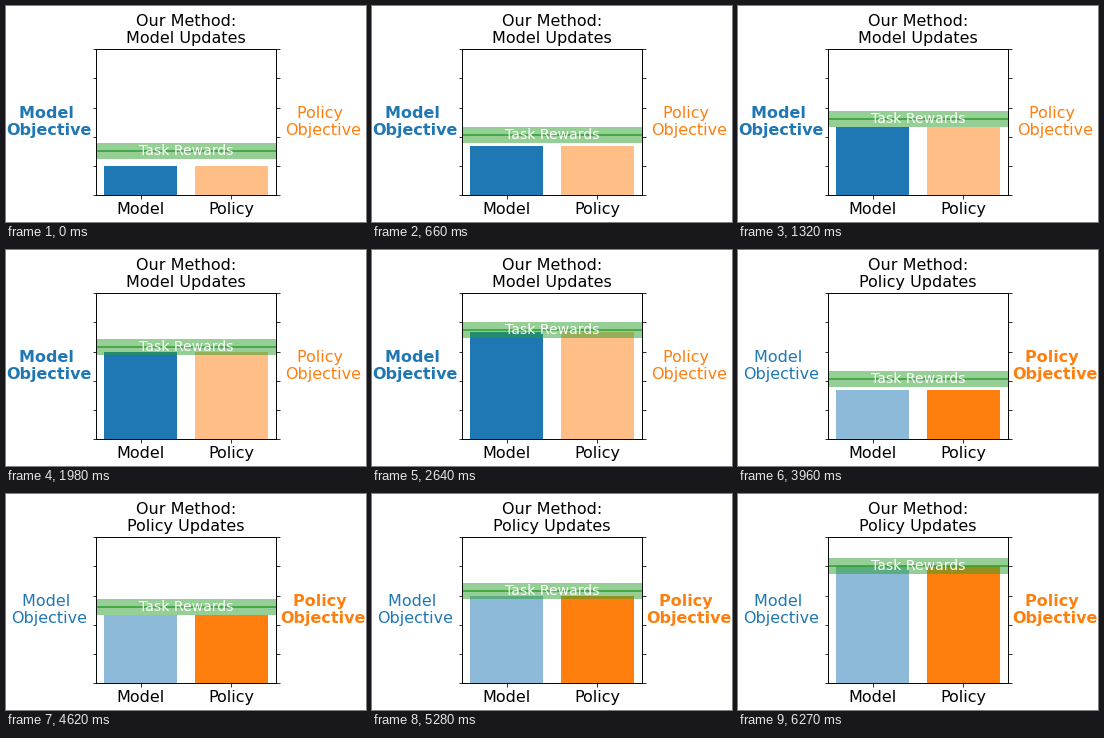
These frames come from a looping animation (360 by 216 pixels, 6600 ms). A matplotlib script:

```python
import matplotlib.pyplot as plt
from matplotlib.animation import FuncAnimation

W, H, DPI = 360, 216, 72
STEPS = 10
NAMES = ["Model", "Policy"]
COLORS = ["C0", "C1"]
BAR_RANGE = (0.2, 0.8)
REWARD_RANGE = (0.3, 0.8)

plt.rcParams["font.family"] = "DejaVu Sans"

fig = plt.figure(figsize=(W / DPI, H / DPI), dpi=DPI, facecolor="white")
fig.subplots_adjust(left=0.25, right=0.75, bottom=0.125, top=0.8)
ax = fig.add_subplot()
twin = ax.twinx()

bars = ax.bar(NAMES, [BAR_RANGE[0]] * 2, color=COLORS)
for axis in (ax, twin):
    axis.set_ylim(0, 1)
    axis.set_yticks([i / 5 for i in range(6)], labels=[""] * 6)
ax.tick_params(axis="x", labelsize=16)

band = ax.axhline(REWARD_RANGE[0], color="C2", lw=16, alpha=0.5)
line = ax.axhline(REWARD_RANGE[0], color="C2", lw=1.5)
caption = ax.text(0.5, REWARD_RANGE[0], "Task Rewards", color="white",
                  fontsize=14, ha="center", va="center")
title = ax.set_title("", fontsize=16)
labels = [
    fig.text(x / W, 0.4625, f"{name} \nObjective", color=color,
             fontsize=16, ha="center", va="center")
    for x, name, color in zip((43, 317), NAMES, COLORS)
]


def lerp(span, t):
    return span[0] + (span[1] - span[0]) * t


def draw(frame):
    active, step = divmod(frame, STEPS)
    t = step / (STEPS - 1)
    reward = lerp(REWARD_RANGE, t)

    title.set_text(f"Our Method:\n{NAMES[active]} Updates")
    for i, (bar, label) in enumerate(zip(bars, labels)):
        bar.set_height(lerp(BAR_RANGE, t))
        bar.set_alpha(1 if i == active else 0.5)
        label.set_fontweight("bold" if i == active else "normal")
    for rule in (band, line):
        rule.set_ydata([reward, reward])
    caption.set_y(reward)
    return [title, band, line, caption, *bars, *labels]


anim = FuncAnimation(fig, draw, frames=2 * STEPS, interval=330,
                     repeat=True, repeat_delay=0, blit=False)
plt.show()
```
